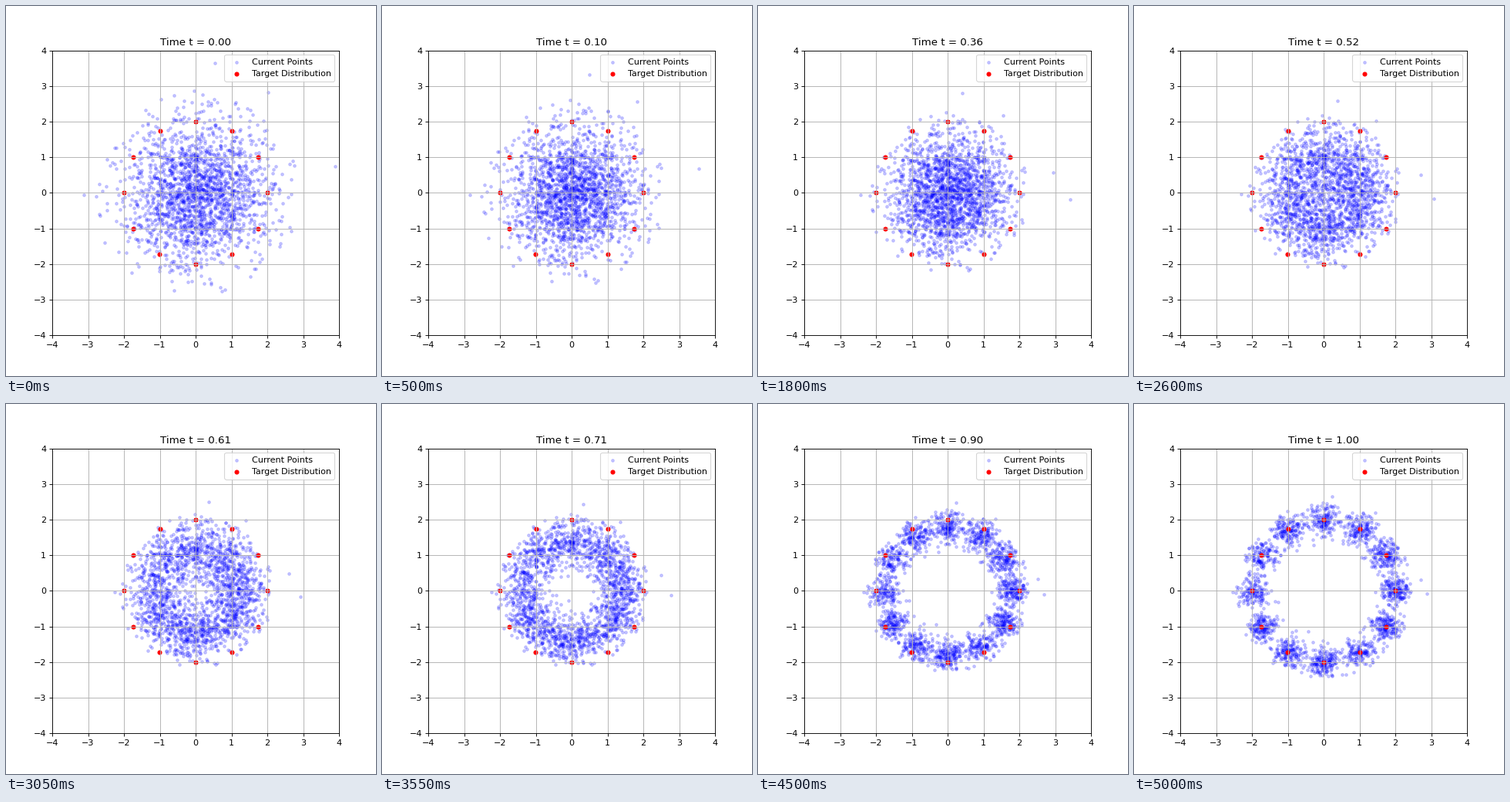
These frames come from a looping animation (480 by 480 pixels, 5.05 s). A matplotlib script:

```python
import numpy as np
import matplotlib.pyplot as plt
from matplotlib.animation import FuncAnimation

STEPS = 100
COUNT = 2000
SPREAD = 0.22   # standard deviation of each final cluster
REACH = 2.95    # radius that holds all but a few stray points

angles = np.arange(12) * np.pi / 6
centers = 2 * np.column_stack([np.cos(angles), np.sin(angles)])
strays = np.array([(0.54, 3.65), (2.02, 2.82), (3.89, 0.74),
                   (4.57, -0.25), (-3.11, -0.06)])


def start_points():
    rng = np.random.default_rng(7)
    cloud = rng.normal((0.05, 0.05), 1, (2 * COUNT, 2))
    cloud = cloud[np.hypot(*cloud.T) < REACH]
    return np.vstack([cloud[:COUNT - len(strays)], strays])


def velocity(x, t):
    """Flow-matching field from a unit Gaussian to the ring of clusters."""
    var = (1 - t) ** 2 + (t * SPREAD) ** 2
    diff = x[:, None] - t * centers
    score = -(diff ** 2).sum(axis=2) / (2 * var)
    weight = np.exp(score - score.max(axis=1, keepdims=True))
    weight /= weight.sum(axis=1, keepdims=True)
    rate = (t * SPREAD ** 2 - (1 - t)) / var
    return (weight[:, :, None] * (centers + rate * diff)).sum(axis=1)


path = [start_points()]
for k in range(STEPS):
    path.append(path[-1] + velocity(path[-1], k / STEPS) / STEPS)

fig, ax = plt.subplots(figsize=(6, 6), dpi=80)
points = ax.scatter(*path[0].T, s=10, color="blue", alpha=0.2,
                    label="Current Points")
ax.scatter(*centers.T, s=20, color="red", label="Target Distribution")
ax.set_xlim(-4, 4)
ax.set_ylim(-4, 4)
ax.grid(True)
ax.legend(loc="upper right")
title = ax.set_title("Time t = 0.00")


def update(k):
    points.set_offsets(path[k])
    title.set_text(f"Time t = {k / STEPS:.2f}")
    return points, title


anim = FuncAnimation(fig, update, frames=STEPS + 1, interval=50,
                     repeat=True, repeat_delay=0)
plt.show()
```
